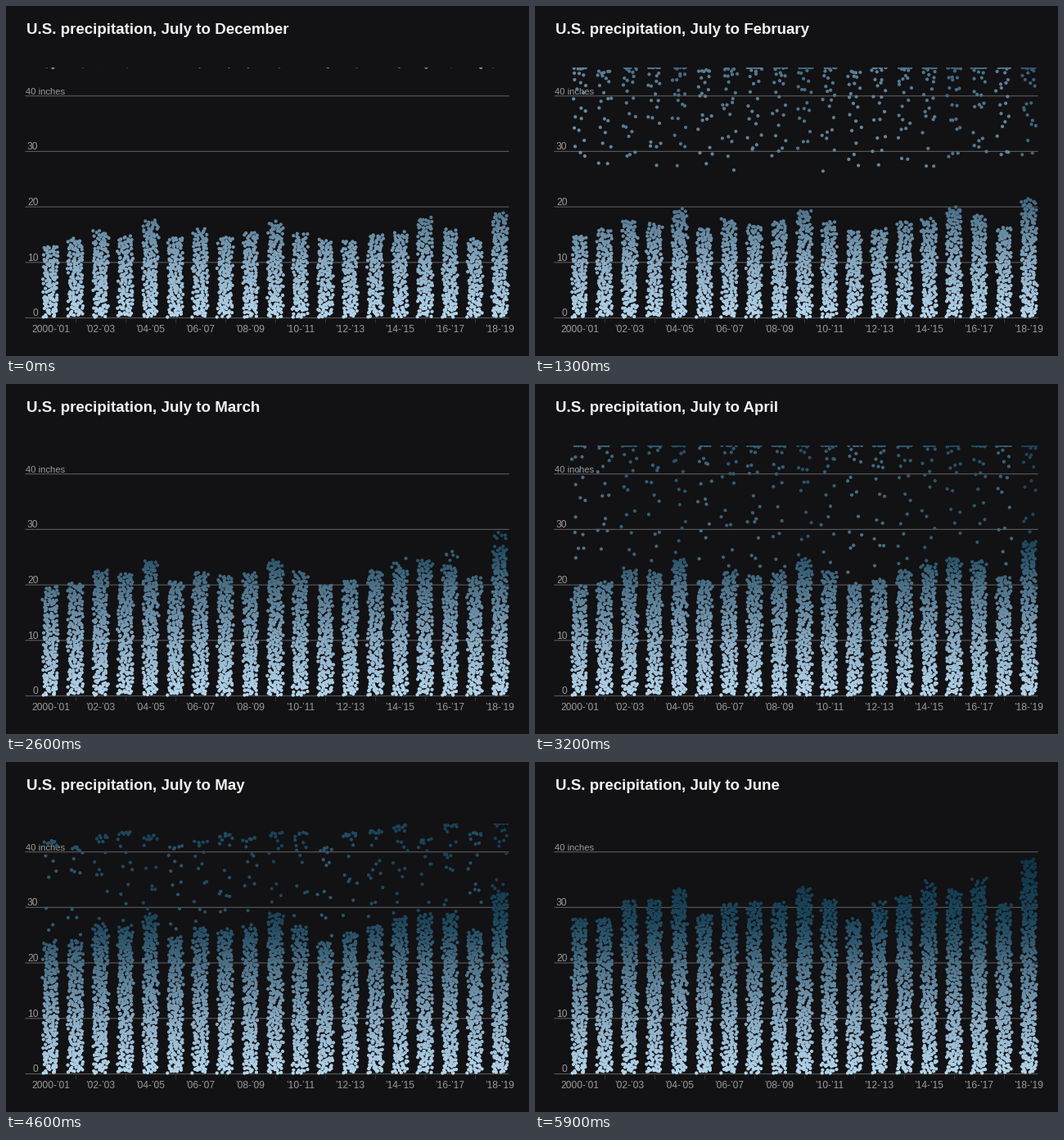
These frames come from a looping animation (639 px wide and 427 px high, 6 s). A matplotlib script:

```python
import numpy as np
import matplotlib.pyplot as plt
from matplotlib.animation import FuncAnimation
from matplotlib.colors import LinearSegmentedColormap
from matplotlib.patches import Rectangle

W, H, DPI = 639, 427, 64
FRAMES, INTERVAL = 60, 100
PT = 72 / DPI  # points per pixel
BG, GRID, LABEL = "#121113", "#565658", "#9b9b9b"

ZERO_Y, INCH = 380.5, 6.77
FIRST_X, STEP_X = 54.5, 30.5
RADIUS, DOT_RISE = 2.1, 0.66
CLOUD_Y, HOLD_Y, GRAVITY = 75, 72, 8.0

# Inches per season, by the end of December and of June.
DECEMBER = np.array([13.4, 14.5, 15.9, 15.0, 17.7, 14.7, 16.2, 14.8, 15.7, 17.5,
                     15.4, 14.3, 14.0, 15.4, 15.7, 18.2, 16.2, 14.5, 19.1])
JUNE = np.array([28.3, 28.4, 31.7, 31.7, 33.6, 29.0, 31.1, 31.1, 31.1, 33.9,
                 31.8, 28.1, 30.5, 32.3, 34.0, 33.4, 34.8, 30.8, 38.9])
GAIN = JUNE - DECEMBER

# Month, first frame of its rain, share of the gain reached, frames of release.
RAIN = [
    ("January", -0.6, 0.13, 3.3),
    ("February", 9.0, 0.29, 3.6),
    ("March", 16.8, 0.44, 4.4),
    ("April", 27.0, 0.59, 5.2),
    ("May", 37.6, 0.81, 6.9),
    ("June", 48.0, 1.00, 7.3),
]
STARTS = np.array([start for _, start, _, _ in RAIN])
SHARES = np.array([0] + [share for _, _, share, _ in RAIN])
LONGER = 0.27  # extra frames of release per inch above the average gain

rng = np.random.default_rng(19)


def build_season(col):
    """Return x, resting y, month and release time of the dots in one column."""
    tops = ZERO_Y - INCH * (DECEMBER[col] + SHARES * GAIN[col]) + RADIUS
    level = np.arange(379, tops[-1], -DOT_RISE)
    n = len(level)
    month = np.minimum((level[:, None] < tops).sum(axis=1), len(RAIN))
    spot = (np.arange(n) * 0.618034) % 1 - 0.5
    x = FIRST_X + col * STEP_X + spot * 17 + rng.uniform(-1.8, 1.8, n)
    y = np.minimum(level + rng.uniform(-1.9, 1.9, n), 379.5)
    release = np.full(n, -100.0)
    for m, (_, start, _, spread) in enumerate(RAIN, 1):
        own = np.flatnonzero(month == m)
        count = len(own)
        spread += LONGER * (GAIN[col] - GAIN.mean())
        order = np.linspace(0, 1.12, count) + rng.uniform(0, 0.12, count)
        release[own] = start + spread * np.minimum(order, 1) + rng.uniform(-0.12, 0.12, count)
    return x, y, month, release


seasons = [build_season(c) for c in range(len(JUNE))]
dot_x, rest_y, dot_month, dot_release = map(np.concatenate, zip(*seasons))
dot_start = np.concatenate([[-100], STARTS])[dot_month]

cmap = LinearSegmentedColormap.from_list("rain", [
    (0.0, "#b5d6ec"), (0.25, "#88aac3"), (0.5, "#4c7189"),
    (0.6, "#30586f"), (0.7, "#1c465c"), (1.0, "#0c3246"),
])
shade = cmap((ZERO_Y - rest_y) / (40 * INCH))

fig = plt.figure(figsize=(W / DPI, H / DPI), dpi=DPI, facecolor=BG)
ax = fig.add_axes([0, 0, 1, 1])
ax.set_xlim(0, W)
ax.set_ylim(H, 0)
ax.axis("off")


def text(x, y, s, size, color=LABEL, **kw):
    return ax.text(x, y, s, fontsize=size * PT, color=color,
                   family="Liberation Sans", va="baseline", **kw)


for inches in range(0, 50, 10):
    y = ZERO_Y - inches * INCH
    ax.plot([24, 614], [y, y], color=GRID, lw=1.2 * PT, zorder=1, snap=False)
    if inches == 40:
        text(24, y - 2, "40 inches", 11.2, zorder=2)
    else:
        text(39.5, y - 2, str(inches), 12, ha="right", zorder=2)

for col in range(len(JUNE)):
    x = FIRST_X + col * STEP_X
    if col % 2:
        ax.plot([x, x], [382, 386], color="#343436", lw=PT, zorder=1)
    else:
        first = "2000" if col == 0 else f"’{col:02d}"
        text(x, 398.5, f"{first}-’{col + 1:02d}", 12, ha="center")

title = text(25, 33.5, "", 18.7, "#f1f1f1", weight="bold")
dots = ax.scatter(dot_x, rest_y, s=(2 * RADIUS * PT) ** 2, c=shade, linewidths=0, zorder=3)
dots.set_clip_path(Rectangle((0, CLOUD_Y), W, H - CLOUD_Y, transform=ax.transData))


def draw(frame):
    # Drops gather at the cloud line, then accelerate down to their place.
    gather = np.clip(1.6 * (frame - dot_start), 0, 3)
    age = np.maximum(frame - dot_release, 0)
    y = HOLD_Y + np.maximum(gather, GRAVITY * age ** 2)
    dots.set_offsets(np.column_stack([dot_x, np.minimum(y, rest_y)]))
    # The title follows one frame after the first drops.
    begun = int((frame >= STARTS + 1).sum())
    month = RAIN[begun - 1][0] if begun else "December"
    title.set_text(f"U.S. precipitation, July to {month}")
    return dots, title


anim = FuncAnimation(fig, draw, frames=FRAMES, interval=INTERVAL, repeat=True, repeat_delay=0)
plt.show()
```
